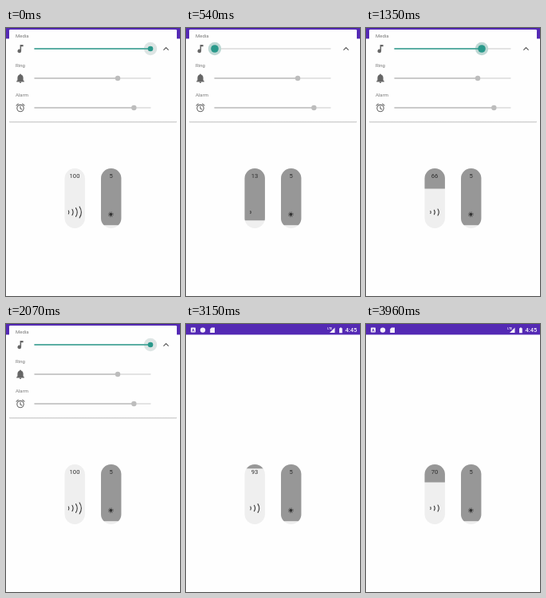
An HTML page that plays this animation: 218 px wide and 336 px high, repeating every 4.65 s.

```html
<!DOCTYPE html>
<html lang="en">
<head>
<meta charset="utf-8">
<title>Volume sliders</title>
<style>
html, body { margin: 0; width: 100%; height: 100%; overflow: hidden; background: #fefefe; }
svg { display: block; width: 218px; height: 336px; font-family: Roboto, sans-serif; }
.label { font-size: 6px; fill: #777; }
.value { font-size: 7.6px; fill: #2c2c2c; text-anchor: middle; }
.line { fill: none; stroke-linecap: round; }
</style>
</head>
<body>
<svg viewBox="0 0 218 336">
  <defs>
    <clipPath id="pillA"><rect x="73.5" y="176" width="25.4" height="75" rx="12.5"/></clipPath>
    <clipPath id="pillB"><rect x="119" y="176" width="25.4" height="75" rx="12.5"/></clipPath>
    <linearGradient id="shade" x2="0" y2="1">
      <stop offset="0" stop-color="#c8c8c8"/><stop offset="1" stop-color="#ececec"/>
    </linearGradient>
  </defs>

  <g id="status">
    <rect width="218" height="13.4" fill="#5429b4"/>
    <g fill="#f4f0fb">
      <rect x="6" y="4.6" width="6" height="6" rx=".8"/>
      <circle cx="21" cy="7.6" r="3.2"/>
      <path d="M32 4.4h4v6.6h-5.8V6.2z"/>
      <path d="M186.5 4.5v6.6h-6.6z"/>
      <path d="M192 5.3h1v-.9h1.8v.9h1v6h-3.8z"/>
      <text x="177.3" y="7.2" font-size="3.6" font-weight="700">LTE</text>
      <text x="199.6" y="10.4" font-size="7.5" font-weight="500">4:45</text>
    </g>
    <path class="line" d="M7.8 9.2l1.2-3.2 1.2 3.2M8.2 8.2h1.6" stroke="#5429b4" stroke-width=".7"/>
  </g>

  <g clip-path="url(#pillA)">
    <rect x="73" y="175" width="27" height="77" fill="#efefef"/>
    <rect id="gap" x="73" y="176" width="27" fill="#979797"/>
  </g>
  <text id="volume" class="value" x="86" y="188.4"></text>
  <path id="waves" class="line" stroke="#333" stroke-width="1.05"/>
  <g id="speaker" class="line" stroke="#222" stroke-width="1">
    <path d="M82.4 229h2l3-2.3v8.6l-3-2.3h-2zM89 228.6q1.8 2.2 0 4.6M82 226.2l8.8 9.4"/>
  </g>

  <g clip-path="url(#pillB)">
    <rect x="118" y="175" width="28" height="77" fill="#efefef"/>
    <rect x="118" y="175" width="28" height="72.2" fill="#979797"/>
  </g>
  <text class="value" x="131.6" y="188.4">5</text>
  <circle cx="131.3" cy="233.8" r="2" fill="#333"/>
  <circle cx="131.3" cy="233.8" r="2.9" fill="none" stroke="#505050" stroke-width="1.1" stroke-dasharray="1 1.28"/>

  <g id="panel">
    <rect x="4" y="116.6" width="210" height="2.4" rx="1" fill="url(#shade)"/>
    <rect x="4" y="2" width="210" height="115" rx="1.2" fill="#fefefe"/>
    <text class="label" x="12" y="12.2">Media</text>
    <text class="label" x="12" y="49.2">Ring</text>
    <text class="label" x="12" y="86.2">Alarm</text>

    <path fill="#666" d="M17.6 21h4v2.2h-2.5v5.7a2.3 2.3 0 1 1-1.5-2.2z"/>
    <path id="slash" class="line" d="M13.6 21.4l8.8 9.4" stroke="#666" stroke-width="1.1"/>
    <path fill="#666" d="M18 57.6a.9.9 0 0 1 .9 1q2.7.8 2.7 4v2.8l1.3 1.4v.6h-9.8v-.6l1.3-1.4v-2.8q0-3.2 2.7-4a.9.9 0 0 1 .9-1zM16.8 67.8h2.4a1.2 1.2 0 0 1-2.4 0z"/>
    <g class="line" stroke="#666" stroke-width="1.1">
      <circle cx="18" cy="100.6" r="4.2"/>
      <path d="M18 98.2v2.7l1.8 1.1M13 97.2l2.3-2M23 97.2l-2.3-2"/>
    </g>
    <path class="line" d="M197.7 27.3l2.8-2.8 2.8 2.8" stroke="#555" stroke-width="1.1"/>

    <g class="line" stroke="#dadada" stroke-width="1.3">
      <path d="M36 26H181M36 63H181M36 100H181"/>
      <path d="M36 63H140M36 100H160" stroke="#c2c2c2"/>
    </g>
    <circle cx="140" cy="63" r="3.2" fill="#bdbdbd"/>
    <circle cx="160.3" cy="100" r="3.2" fill="#bdbdbd"/>
    <circle id="halo" cy="26" r="8.2"/>
    <path id="track" class="line" stroke="#2f9d8f" stroke-width="1.6"/>
    <circle id="thumb" cy="26" fill="#2a998b"/>
  </g>
</svg>
<script>
const LOOP = 4650, STEP = 30;
const $ = id => document.getElementById(id);
const set = (id, attrs) => {
  for (const key in attrs) $(id).setAttribute(key, attrs[key]);
};

// [time, value] points, joined by straight lines
const thumbPath = [[0, 181], [330, 94], [540, 36], [1020, 36], [1050, 40], [1350, 145], [1500, 181]];
const levelPath = [[60, 15], [330, 10], [600, 0], [1050, 0], [1350, 10], [1500, 15]];
const dragPath = [[3120, 100], [3150, 93], [3600, 40], [3660, 40], [3960, 70]];

function at(points, t) {
  if (t <= points[0][0]) return points[0][1];
  for (let i = 1; i < points.length; i++) {
    const [t0, a] = points[i - 1], [t1, b] = points[i];
    if (t <= t1) return a + (b - a) * (t - t0) / (t1 - t0);
  }
  return points[points.length - 1][1];
}

function volumeAt(t) {
  if (t >= 3120) return Math.round(at(dragPath, t));
  return Math.floor(Math.round(at(levelPath, t)) * 100 / 15);
}

function wavePath(v) {
  const full = v >= 97;
  const count = full ? 4 : v >= 50 ? 3 : v >= 25 ? 2 : 1;
  const top = full ? 7 : v >= 80 ? 5.4 : 4;
  const left = full ? 78.3 : 80.8;
  let d = "";
  for (let i = 0; i < count; i++) {
    const h = full ? 2 + i * 1.67 : top * (0.36 + i * 0.32);
    const x = left + i * 4.6;
    d += `M${x} ${231 - h}q${h * 0.65} ${h} 0 ${2 * h}`;
  }
  return d;
}

// Slow start, fast finish
function slide(t) {
  const k = Math.min(1, Math.max(0, (t - 2160) / 270));
  return 1 - (1 - Math.pow(100, k - 1)) / 0.99;
}

function draw(now) {
  const t = Math.floor((now % LOOP) / STEP) * STEP;
  const x = at(thumbPath, t), v = volumeAt(t);
  const press = t < 30 ? 0 : Math.min(1, Math.max(0, (1890 - t) / 90));
  const mute = v === 0;

  set("track", { d: `M36 26H${x}` });
  set("thumb", { cx: x, r: 3.3 + 1.5 * press });
  set("halo", { cx: x, fill: press > 0 ? "#bed8d4" : "#dde5e4" });
  set("slash", { visibility: mute ? "visible" : "hidden" });
  set("panel", {
    transform: `translate(0 ${-120 * slide(t)})`,
    visibility: t >= 2430 ? "hidden" : "visible"
  });
  $("slash").style.display = t >= 2430 ? "none" : "";

  set("gap", { height: 75 * (1 - v / 100) + (mute ? 1 : 0) });
  $("volume").textContent = v;
  set("waves", { d: mute ? "" : wavePath(v) });
  set("speaker", { visibility: mute ? "visible" : "hidden" });
}

let start;
function tick(now) {
  if (start === undefined) start = now;
  draw(Math.max(0, now - start));
  requestAnimationFrame(tick);
}
draw(0);
requestAnimationFrame(tick);
</script>
</body>
</html>
```
